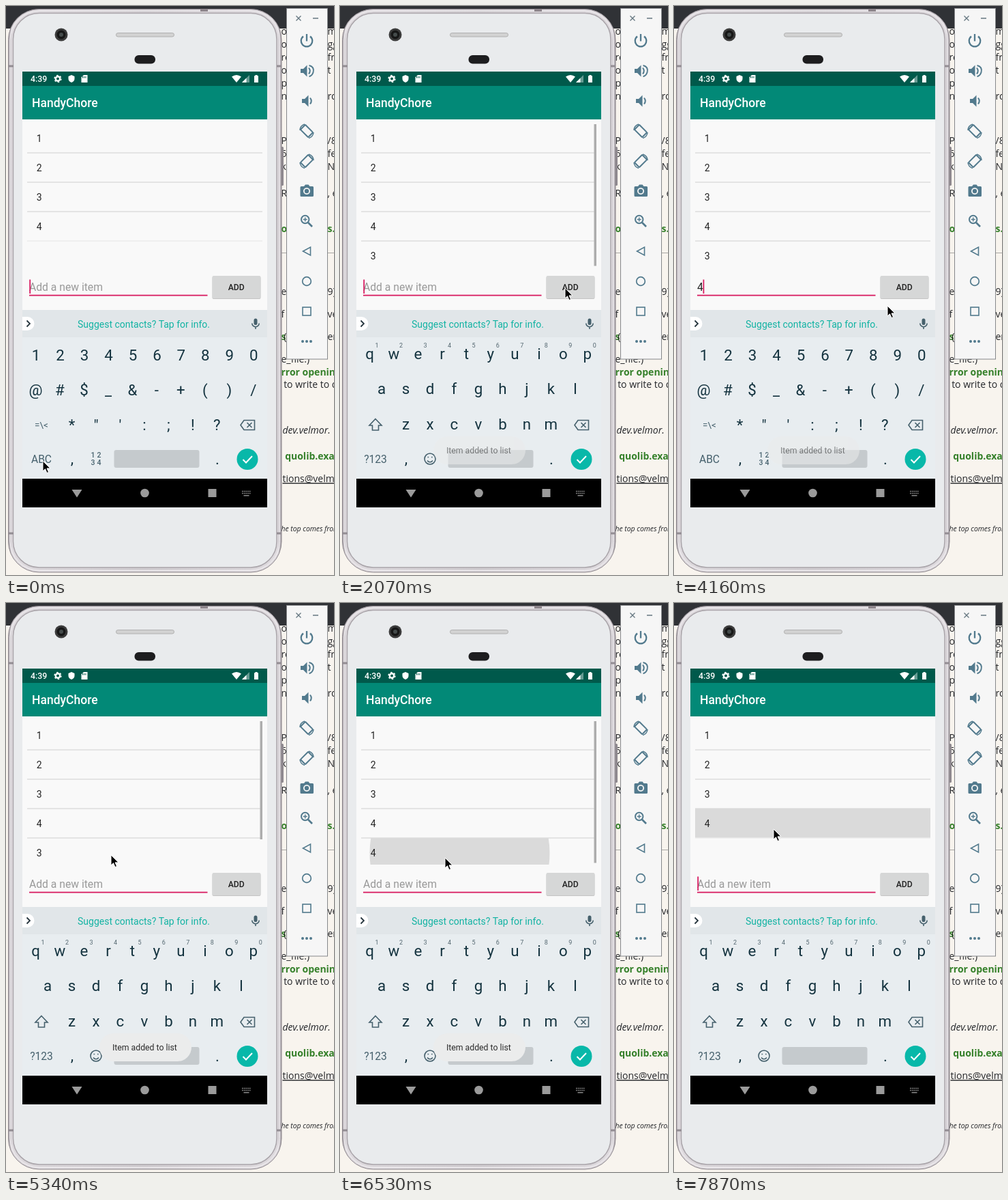
Animation, 481 px wide and 833 px high, one loop 8000 ms. Source, as an HTML page:

```html
<!DOCTYPE html>
<html lang="en">
<head>
<meta charset="utf-8">
<title>To-do list demo</title>
<style>
html, body { margin: 0; width: 100%; height: 100%; overflow: hidden; background: #f8f4ee; }
svg { display: block; width: 100%; height: 100%; }
text { font-family: Roboto, sans-serif; white-space: pre; }
.page text { font: 14px "Open Sans", "Noto Sans", sans-serif; fill: #24262a; }
.page .b { font-weight: 700; fill: #35802a; }
.page .i { font-style: italic; }
.page .u { text-decoration: underline; }
.page .s { font-size: 10.4px; }
.key { font-size: 22.3px; fill: #14333f; text-anchor: middle; }
.alt { font-size: 9px; fill: #53666f; text-anchor: middle; }
.mode { font-size: 15.6px; fill: #45606c; text-anchor: middle; }
.quad { font-size: 10.5px; font-weight: 500; fill: #45606c; letter-spacing: 3px; }
.row { font-size: 14px; fill: #222; }
.line { fill: none; stroke: #45606c; stroke-width: 1.6; }
.tool { fill: none; stroke: #527a8d; stroke-width: 2; }
.tool .fill { fill: #527a8d; stroke: none; }
</style>
</head>
<body>
<svg viewBox="0 0 481 833" preserveAspectRatio="none">
  <defs>
    <linearGradient id="rim" x2="1" y2="0">
      <stop stop-color="#a7a1a7"/><stop offset=".012" stop-color="#dedade"/>
      <stop offset=".5" stop-color="#d0ccd0"/><stop offset=".988" stop-color="#dedade"/>
      <stop offset="1" stop-color="#a09aa0"/>
    </linearGradient>
    <clipPath id="listBox"><rect x="31" y="173" width="346" height="210"/></clipPath>
    <clipPath id="rowBox"><rect id="rowClip" x="31" width="345"/></clipPath>
  </defs>

  <rect width="481" height="833" fill="#f8f4ee"/>
  <rect width="481" height="33" fill="#303236"/>
  <g class="page" id="page"></g>
  <path d="M404 361.500H481" stroke="#a9a7a4"/>

  <!-- phone body -->
  <rect x="403" y="206" width="4" height="57" rx="1.500" fill="#8f898f"/>
  <rect x="3.500" y="4.500" width="400.500" height="824.500" rx="45" fill="url(#rim)" stroke="#8c868c"/>
  <rect x="6" y="7" width="395.500" height="819.500" rx="43" fill="none" stroke="#f4f1f4"/>
  <rect x="10.500" y="10.500" width="386.500" height="811.500" rx="38" fill="#e9ebed" stroke="#aaa5aa" stroke-width="1.500"/>
  <path d="M4 88h7M397 88h7M4 772h7M397 772h7" stroke="#938d93" stroke-width="3"/>
  <rect x="285" y="4" width="11" height="4" fill="#8d858b"/>
  <circle cx="81" cy="42" r="9.500" fill="#3c3c3c"/>
  <circle cx="81" cy="42" r="6.500" fill="#171717"/>
  <circle cx="81" cy="42" r="3" fill="#454b4b"/>
  <rect x="161.500" y="39.500" width="85" height="5.500" rx="2.700" fill="#d2d2d2" stroke="#b0b0b0"/>
  <rect x="188.500" y="72" width="30.500" height="12.500" rx="6" fill="#1d1d1f"/>

  <!-- app -->
  <rect x="24" y="96" width="359" height="638" fill="#f9f9f9"/>
  <rect x="24" y="96" width="359" height="21" fill="#00594b"/>
  <rect x="24" y="117" width="359" height="49" fill="#028977"/>
  <text x="36" y="111" font-size="12.300" font-weight="500" fill="#fff">4:39</text>
  <text x="38" y="148" font-size="17.500" font-weight="500" fill="#fff">HandyChore</text>
  <g fill="#fff">
    <circle cx="76" cy="106.500" r="3.200" fill="none" stroke="#fff" stroke-width="2.400"/>
    <circle cx="76" cy="106.500" r="4.900" fill="none" stroke="#fff" stroke-width="1.500" stroke-dasharray="2.560"/>
    <path d="M96 101l4.500 2v3.500q0 3.800-4.500 5.500q-4.500-1.700-4.500-5.500V103z"/>
    <path d="M114 101h5.500v11h-9v-7.500z"/>
    <path d="M331 103.500q7-5 14 0l-7 8.500z"/>
    <path d="M357 101v11h-11z" opacity=".4"/><path d="M352.500 105.500V112H346z"/>
    <path d="M365.500 101h3v1.200h1.500V112h-6v-9.800h1.500z"/>
  </g>
  <path d="M112.500 103v2.500M114.700 103v2.500M116.900 103v2.500" stroke="#00594b"/>

  <g clip-path="url(#listBox)">
    <circle id="ripple" fill="#dadada" clip-path="url(#rowBox)"/>
    <g id="rows"></g>
    <rect id="bar" x="372.500" y="173" width="3.500" fill="#adadad"/>
  </g>

  <rect x="34" y="422.700" width="261.500" height="1.800" fill="#d81b60"/>
  <text id="hint" x="34" y="417" font-size="15.700" fill="#999">Add a new item</text>
  <text id="entry" x="34" y="417" font-size="15.700" fill="#222"></text>
  <rect id="caret" y="400.500" width="1.800" height="20.500" fill="#d81b60"/>
  <rect x="302.500" y="396" width="71" height="33" rx="2" fill="#c4c4c4"/>
  <rect x="302.500" y="395" width="71" height="33" rx="2" fill="#d6d7d7"/>
  <text x="337.700" y="415.700" font-size="12.200" font-weight="500" fill="#222" text-anchor="middle">ADD</text>

  <!-- keyboard -->
  <rect x="24" y="445" width="359" height="40" fill="#e1e6e9"/>
  <rect x="24" y="485" width="359" height="207" fill="#e8edf0"/>
  <path d="M24 455h7.500a10 10 0 0 1 0 20H24z" fill="#fff"/>
  <path d="M30.500 460.500l4.500 4.500-4.500 4.500" fill="none" stroke="#26363e" stroke-width="1.800"/>
  <text x="105" y="470.500" font-size="14" fill="#12b3a3">Suggest contacts? Tap for info.</text>
  <rect x="363.500" y="457.500" width="5" height="9.500" rx="2.500" fill="#45606c"/>
  <path class="line" d="M360.800 464.500a5.200 5.200 0 0 0 10.400 0M366 470v3"/>
  <g id="symbols"></g>
  <g id="letters"></g>
  <path class="line" d="M349 606.500h15.500v14H349l-5-7zM353.500 610l7 7m0-7l-7 7"/>
  <text class="key" x="97" y="670">,</text>
  <text class="key" x="310" y="671">.</text>
  <rect x="158.500" y="650" width="125" height="26" rx="3" fill="#c5cacd"/>
  <circle cx="354" cy="663.500" r="15.500" fill="#08b8a9"/>
  <path d="M347.500 664l4.500 4.500 9-9.500" fill="none" stroke="#fff" stroke-width="2"/>

  <rect x="24" y="692" width="359" height="42"/>
  <g fill="#9b9b9b">
    <path d="M96.500 708h15l-7.500 11.500z"/><circle cx="203.500" cy="713" r="6.300"/>
    <rect x="296.500" y="707" width="12" height="12"/>
  </g>
  <path d="M346 710.500h13M346 713.500h13" stroke="#8b8b8b" stroke-width="1.700" stroke-dasharray="1.700 1"/>
  <path d="M348.500 716.700h8" stroke="#8b8b8b" stroke-width="1.500"/>

  <g id="toast">
    <rect x="137" y="630" width="135" height="41" rx="20.500" fill="#ebecec"/>
    <text x="156" y="654.500" font-size="12.250" fill="#2c2c2c">Item added to list</text>
  </g>

  <!-- emulator toolbar -->
  <rect x="411.500" y="3.500" width="60" height="513.500" fill="#f6f6f6" stroke="#85878a"/>
  <path d="M425.500 14.500l7 7m0-7l-7 7M450 18h8" fill="none" stroke="#667780" stroke-width="1.400"/>
  <g class="tool">
    <path d="M436 44.500a8.300 8.300 0 1 0 10 0M441 41v10.500" stroke-width="2.300"/>
    <path class="fill" d="M432 92h4l5.500-5.500v17L436 98h-4zM432 136h0"/>
    <path d="M444 90.500q3.500 4.500 0 9M444.500 87q8 2 6 10q-1.500 5-6 6.300"/>
    <path class="fill" d="M434 136h4l5.500-5.500v17L438 142h-4z"/>
    <path d="M446 134.500q3.500 4.500 0 9"/>
    <g id="turn">
      <rect x="-8" y="-5" width="16" height="10" rx="1" transform="rotate(45)"/>
      <path d="M-10-1a10 10 0 0 1 7-9M10 2a10 10 0 0 1-7 8.500" stroke-width="1.500"/>
    </g>
    <use id="turnBack" href="#turn"/>
    <path class="fill" fill-rule="evenodd" d="M433 264h4l2-2.500h4.500l2 2.500h4q1.500 0 1.500 1.500v12q0 1.500-1.500 1.500H433q-1.500 0-1.500-1.500v-12q0-1.500 1.500-1.500zM441 266a5 5 0 1 0 .01 0z"/>
    <circle class="fill" cx="441" cy="271" r="3.200"/>
    <circle cx="438.700" cy="312.500" r="5.700"/>
    <path d="M443 317l6 6" stroke-width="2.600"/><path d="M435.700 312.500h6M438.700 309.500v6" stroke-width="1.400"/>
    <path d="M446.500 353v12l-11-6z" stroke-width="1.600"/>
    <circle cx="441" cy="403" r="6.300" stroke-width="1.700"/>
    <rect x="435" y="441" width="12" height="12" stroke-width="1.600"/>
    <path d="M435 491h.01M441 491h.01M447 491h.01" stroke-width="4" stroke-linecap="round"/>
  </g>

  <path id="mouse" d="M0 0V15l3.500-3.300 2.500 5.800 2.500-1.100-2.500-5.500h5z" fill="#000" stroke="#fff"/>
</svg>
<script>
const $ = id => document.getElementById(id);
const set = (id, attrs) => { for (const k in attrs) $(id).setAttribute(k, attrs[k]); };
const esc = s => s.replace(/&/g, '&amp;').replace(/</g, '&lt;');
const label = (cls, x, y, s) => `<text class="${cls}" x="${x}" y="${y}">${esc(s)}</text>`;
const STEP = 35.48;
const keys = (chars, x, y) => [...chars].map((c, i) => label('key', x + i * STEP, y, c)).join('');

// Page behind the phone: [y, left text, right text, style]
const page = [
  [42, 'on', 'm'], [61, 'oy', 'gg'], [80, 're', 'fr'], [99, 'o', 't'], [118, 'p', ''], [137, 'n', 'rd'],
  [202, 'P/', '/8'], [221, '6', 'fe'], [240, 'k', 'NE'], [279, 'RA', ', e'], [331, 'o', 's.', 'b'],
  [423, 'e', '9)'], [456, 'f', 've'], [489, 's', '', 'b'], [489, ' (', 'er'],
  [522, 'e_file:)', ''], [541, 'rror opening', '', 'b'], [559, ' to write to c', ''],
  [626, 'dev.velmor.', '', 'i'], [664, ' quolib.exa', '', 'b'], [697, 'tions@velm', '', 'u'],
  [769, 'he top comes from', '', 'i s']
];
$('page').innerHTML = page.map(([y, a, b, cls = '']) =>
  label(cls, y > 600 && y < 700 ? 405.5 : 403.5, y, a) + label(cls, 471.5, y, b)).join('');

$('symbols').innerHTML =
  keys('1234567890', 44, 519) + keys('@#$_&-+()/', 43.5, 570) + keys('*"\':;!?', 96.5, 621) +
  '<text class="mode" x="52" y="618" style="font-size:13.5px">=\\&lt;</text>' + label('mode', 52, 668.5, 'ABC') +
  label('quad', 124.5, 661, '12') + label('quad', 124.5, 672, '34');
$('letters').innerHTML =
  keys('qwertyuiop', 43.5, 517) + keys('asdfghjkl', 61, 568) + keys('zxcvbnm', 96.5, 620) +
  [...'1234567890'].map((c, i) => label('alt', 54 + i * STEP, 500, c)).join('') +
  label('mode', 52, 668.5, '?123') +
  '<path class="line" d="M52 604.500l9 9.500h-4.500v7h-9v-7H43z"/>' +
  '<circle class="line" cx="132" cy="663" r="8"/>' +
  '<path class="line" d="M128 665.500q4 4.500 8 0M128.500 660.500h1.600M134 660.500h1.600"/>';
set('turn', { transform: 'translate(441 183)' });
set('turnBack', { transform: 'translate(441 227) scale(-1 1) translate(-441 -183)'.replace('translate(-441 -183)', 'translate(-441 -183)') });

const LOOP = 8000, TICK = 148.3;

// Pointer path: [tick, x, y]
const path = [
  [0, 54, 666], [1, 54, 667], [2, 75, 615], [3, 104, 540], [4, 112, 520], [6, 112, 520], [7, 165, 494],
  [8, 255, 450], [9, 312, 421], [10, 326, 416], [11, 330, 413], [14, 330, 413], [15, 285, 450],
  [16, 200, 540], [17, 120, 615], [18, 75, 652], [19, 54, 662], [23, 54, 662], [24, 100, 590],
  [25, 148, 522], [26, 148, 522], [28, 313, 439], [29, 328, 418], [30, 330, 414], [32, 330, 414],
  [34, 205, 385], [35, 160, 371], [36, 154, 369], [41, 154, 369], [42, 154, 373], [47, 154, 373],
  [48, 149, 350], [49, 146, 331], [54, 146, 331]
];
function pointer(k) {
  const i = Math.max(1, path.findIndex(p => p[0] >= k));
  const [k0, x0, y0] = path[i - 1], [k1, x1, y1] = path[i];
  const u = (k - k0) / (k1 - k0);
  return [x0 + (x1 - x0) * u, y0 + (y1 - y0) * u];
}

const within = (k, a, b) => k >= a && k < b;
const ADD = [13, 31], CUT = [41, 47], TYPE = [5, 26];

function items(k) {
  const list = ['1', '2', '3', '4'];
  if (k >= ADD[0]) list.push('3');
  if (k >= ADD[1]) list.push('4');
  CUT.forEach(c => { if (k >= c) list.splice(4, 1); });
  return list;
}

function toastAlpha(k) {
  for (const a of ADD) {
    const age = k - a;
    if (age === 1 || age === 15) return 0.55;
    if (age > 1 && age < 15) return 1;
  }
  return 0;
}

// Long presses: [start tick, release tick, row]
const presses = [[38, 41, 4], [44, 47, 4], [51, 55, 3]];
function drawRipple(k, x) {
  const press = presses.find(p => within(k, p[0], p[1]));
  if (!press) return set('ripple', { r: 0 });
  const top = 172.5 + press[2] * 43, first = k === press[0];
  set('rowClip', { y: top - 0.5, height: 43 });
  set('ripple', { cx: first ? x + 21.5 : 203.5, cy: top + 21.5, r: first ? 132 : 176 });
}

function draw(t) {
  const k = Math.floor((t % LOOP + 10) / TICK) % 54;
  const list = items(k);
  $('rows').innerHTML = list.map((s, i) => {
    const y = 172.5 + i * 43;
    const last = i === list.length - 1;
    return label('row', 44.7, y + 26.5, s) +
      `<rect x="31" y="${y + 41.8}" width="345" height="1.4" fill="${last ? '#ebebeb' : '#dcdcdc'}"/>`;
  }).join('');

  const barOn = within(k, 13, 23) || within(k, 31, 47);
  set('bar', { height: list.length > 5 ? 173 : 207.5, opacity: barOn ? 1 : 0 });

  const text = within(k, TYPE[0], ADD[0]) ? '3' : within(k, TYPE[1], ADD[1]) ? '4' : '';
  $('entry').textContent = text;
  set('hint', { opacity: text ? 0 : 1 });
  const lastEdit = [0, ...TYPE, ...ADD].filter(e => e <= k).reduce((a, b) => Math.max(a, b));
  const lit = Math.floor((k - lastEdit) * TICK / 500) % 2 === 0;
  set('caret', { x: text ? 42.5 : 34.3, opacity: lit ? 1 : 0 });

  const symbols = k < 13 || within(k, 20, 31);
  set('symbols', { display: symbols ? 'inline' : 'none' });
  set('letters', { display: symbols ? 'none' : 'inline' });
  set('toast', { opacity: toastAlpha(k) });

  const [x, y] = pointer(k);
  drawRipple(k, x);
  set('mouse', { transform: `translate(${x} ${y})` });
}

let start;
function loop(now) {
  start ??= now;
  draw(now - start);
  requestAnimationFrame(loop);
}
draw(0);
requestAnimationFrame(loop);
</script>
</body>
</html>
```
